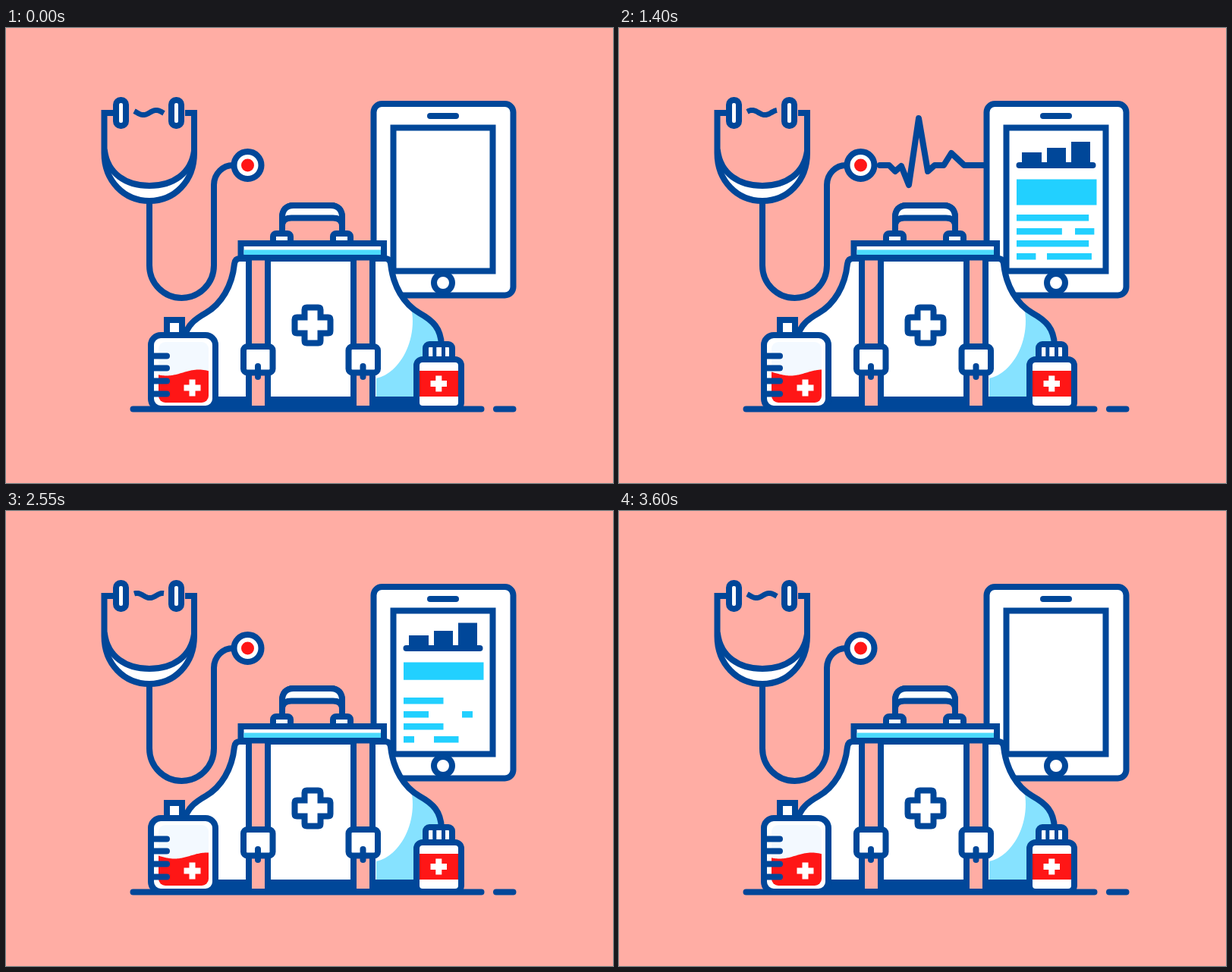
These frames come from a looping animation (800 by 600 pixels, 3.65 s). An HTML page:

```html
<!DOCTYPE html>
<html lang="en">
<head>
<meta charset="utf-8">
<title>Medical kit</title>
<style>
  html, body { margin: 0; width: 100%; height: 100%; overflow: hidden; background: #ffada4; }
  svg { display: block; }
  .line { fill: none; stroke: #004799; stroke-width: 8; stroke-linecap: round; stroke-linejoin: round; }
  .box { fill: #fff; stroke: #004799; stroke-width: 8; }
  .butt { stroke-linecap: butt; stroke-linejoin: miter; }
  .strap { fill: #ffada4; stroke: #004799; stroke-width: 8; }
  .white { fill: #fff; }
  .red { fill: #ff1616; }
  .navy { fill: #004799; }
  .cyan { fill: #22d0ff; }
</style>
</head>
<body>
<svg width="800" height="600" viewBox="0 0 800 600">
  <defs>
    <clipPath id="liquid"><rect x="201" y="414" width="66" height="80" rx="9"/></clipPath>
    <g id="buckle">
      <rect class="box" x="313" y="420" width="38.5" height="34.5" rx="5"/>
      <path class="line" d="M332 446V460"/>
    </g>
  </defs>

  <!-- stethoscope -->
  <path class="white" d="M130 162C134 192 158 208 189 208S244 192 248 162C246 205 218 228 189 228S132 205 130 162Z"/>
  <path class="line" d="M130 162C134 192 158 208 189 208S244 192 248 162"/>
  <path class="line butt" d="M142 112H129.5V165C129.5 202 156 228 189 228S248 202 248 165V112H236"/>
  <path class="line butt" d="M189 228V313A42.5 43 0 0 0 274 313V207A25 26 0 0 1 300 181"/>
  <rect class="box" x="145" y="95" width="13" height="34" rx="6"/>
  <rect class="box" x="218" y="95" width="13" height="34" rx="6"/>
  <path class="line butt" id="ripple" style="stroke-width:7"/>
  <path class="line" id="pulse" d="M340 181H356L364 189L372 182L382 207L395 119L407 189L416 181H428L438 165L455 181H484"/>
  <circle class="box" cx="318.5" cy="181" r="18"/>
  <circle class="red" cx="318.5" cy="181" r="8.5"/>

  <!-- tablet -->
  <rect class="box" x="484.5" y="100" width="184" height="252.5" rx="11"/>
  <path class="line" d="M559 116H593"/>
  <rect class="box" x="510.5" y="131.5" width="131" height="189"/>
  <circle class="box" cx="576" cy="336" r="12"/>
  <g id="screen"></g>
  <path class="line" id="axis"/>

  <!-- bag -->
  <path class="line" d="M364 272V250C364 240 369 234 379 234H428C438 234 443 240 443 250V272"/>
  <path class="box" d="M364 262V250C364 240 369 234 379 234H428C438 234 443 240 443 250V262C443 254 439 250.5 431 250.5H376C368 250.5 364 254 364 262Z"/>
  <rect class="box" x="352" y="271" width="23" height="16" rx="4"/>
  <rect class="box" x="431" y="271" width="23" height="16" rx="4"/>
  <path class="white" d="M308 304Q302 304 301 311C298 340 284 364 263 376C245 386 235 396 234 418V490H574V418C573 396 563 386 545 376C524 364 510 340 507 311Q506 304 500 304Z"/>
  <path fill="#86e2ff" d="M534 368C543 410 520 455 488 462V490H574V418C573 396 563 386 545 376Z"/>
  <path class="line" d="M234 418C235 396 245 386 263 376C284 364 298 340 301 311Q302 304 308 304H500Q506 304 507 311C510 340 524 364 545 376C563 386 573 396 574 418"/>
  <rect class="navy" x="270" y="486" width="280" height="16"/>
  <rect class="strap" x="320" y="300" width="25" height="202"/>
  <rect class="strap" x="458" y="300" width="25" height="202"/>
  <path class="line" d="M167.5 502.5H626.5M646 502.5H668.5"/>
  <rect class="box" x="309.5" y="284" width="188.5" height="18.5"/>
  <rect fill="#4cdafc" x="313.5" y="292.5" width="180.5" height="6.5"/>
  <use href="#buckle"/>
  <use href="#buckle" x="138.5"/>
  <path class="box" d="M396.5 368.5h15q3 0 3 3v10h10q3 0 3 3v15q0 3-3 3h-10v10q0 3-3 3h-15q-3 0-3-3v-10h-10q-3 0-3-3v-15q0-3 3-3h10v-10q0-3 3-3z"/>

  <!-- blood bottle -->
  <rect class="box" x="212" y="385" width="20" height="22"/>
  <rect class="box" x="191" y="405" width="85" height="97" rx="13"/>
  <g clip-path="url(#liquid)">
    <rect x="195" y="405" width="80" height="93" fill="#f3f9ff"/>
    <path class="red" id="blood"/>
  </g>
  <path class="line" d="M194 432.5H212M194 448.5H212M194 465.5H212M194 482.5H212"/>
  <path stroke="#fff" stroke-width="8" d="M234.5 474.5H256.5M245.5 463.5V485.5"/>

  <!-- pill bottle -->
  <rect class="box" x="553" y="417" width="35" height="24" rx="5"/>
  <path class="line" d="M564.8 417V437M576.5 417V437" style="stroke-width:5"/>
  <rect class="box" x="541" y="437" width="59" height="65" rx="8"/>
  <rect class="red" x="545" y="452" width="51" height="34"/>
  <path stroke="#fff" stroke-width="8" d="M559.5 469H581M570.3 458.5V479.5"/>
</svg>
<script>
const LOOP = 3650, STEP = 50;
const find = id => document.getElementById(id);
const ripple = find('ripple'), blood = find('blood'), pulse = find('pulse'), axis = find('axis');

function ease(t, from, to) {
  const p = Math.min(1, Math.max(0, (t - from) / (to - from)));
  return p * p * (3 - 2 * p);
}

// Each timing is [grow from, grow to, shrink from, shrink to].
const shown = (t, [a, b, c, d]) => ease(t, a, b) - ease(t, c, d);
const axisTime = [850, 1050, 3050, 3350];
const lineTime = [970, 1500, 2350, 2750];
const lines = [[524, 246, 105], [524, 264, 66], [601, 264, 28], [524, 280, 105], [524, 297, 28], [564, 297, 65]];

const parts = [
  { x: 531, y: 164, w: 26, h: 17, grow: 'up', time: [850, 1050, 2760, 3050] },
  { x: 564, y: 158, w: 25, h: 23, grow: 'up', time: [1050, 1300, 2700, 3000] },
  { x: 596, y: 147.5, w: 25, h: 34, grow: 'up', time: [1150, 1450, 2850, 3150] },
  { x: 524, y: 199.5, w: 105.5, h: 34, grow: 'down', time: [900, 1350, 2400, 2800] },
  ...lines.map(([x, y, w]) => ({ x, y, w, h: 8.5, grow: 'right', time: lineTime }))
];

for (const part of parts) {
  part.node = document.createElementNS('http://www.w3.org/2000/svg', 'rect');
  part.node.setAttribute('class', part.grow === 'up' ? 'navy' : 'cyan');
  find('screen').append(part.node);
}

function place({ node, x, y, w, h, grow, time }, t) {
  const k = shown(t, time);
  const width = grow === 'right' ? w * k : w;
  const height = grow === 'right' ? h : h * k;
  const top = grow === 'up' ? y + h - height : y;
  Object.entries({ x, y: top, width, height }).forEach(([name, value]) => node.setAttribute(name, value));
}

// A sine line from x0 to x1 with a crest at the given x.
function wave(x0, x1, mid, height, length, crest) {
  let d = '';
  for (let x = x0; x <= x1; x++) {
    const y = mid - height * Math.cos(2 * Math.PI * (x - crest) / length);
    d += (d ? 'L' : 'M') + x + ' ' + y.toFixed(2);
  }
  return d;
}

function draw(t) {
  ripple.setAttribute('d', wave(169, 208, 111.5, 3.1, 34, 198 + 34 * t / 600));
  blood.setAttribute('d', wave(200, 268, 454.5, 4, 85, 254 + 85 * t / 1200) + 'V500H200Z');

  const total = pulse.getTotalLength();
  const head = total * ease(t, 200, 965), tail = total * ease(t, 1350, 2130);
  pulse.style.visibility = head > tail ? 'visible' : 'hidden';
  pulse.style.strokeDasharray = `${head - tail} ${total * 2}`;
  pulse.style.strokeDashoffset = -tail;

  const k = shown(t, axisTime);
  axis.setAttribute('d', k > 0 ? `M527.5 181H${527.5 + 97 * k}` : '');
  parts.forEach(part => place(part, t));
}

function tick() {
  draw(Math.floor(performance.now() % LOOP / STEP) * STEP);
  requestAnimationFrame(tick);
}
tick();
</script>
</body>
</html>
```
